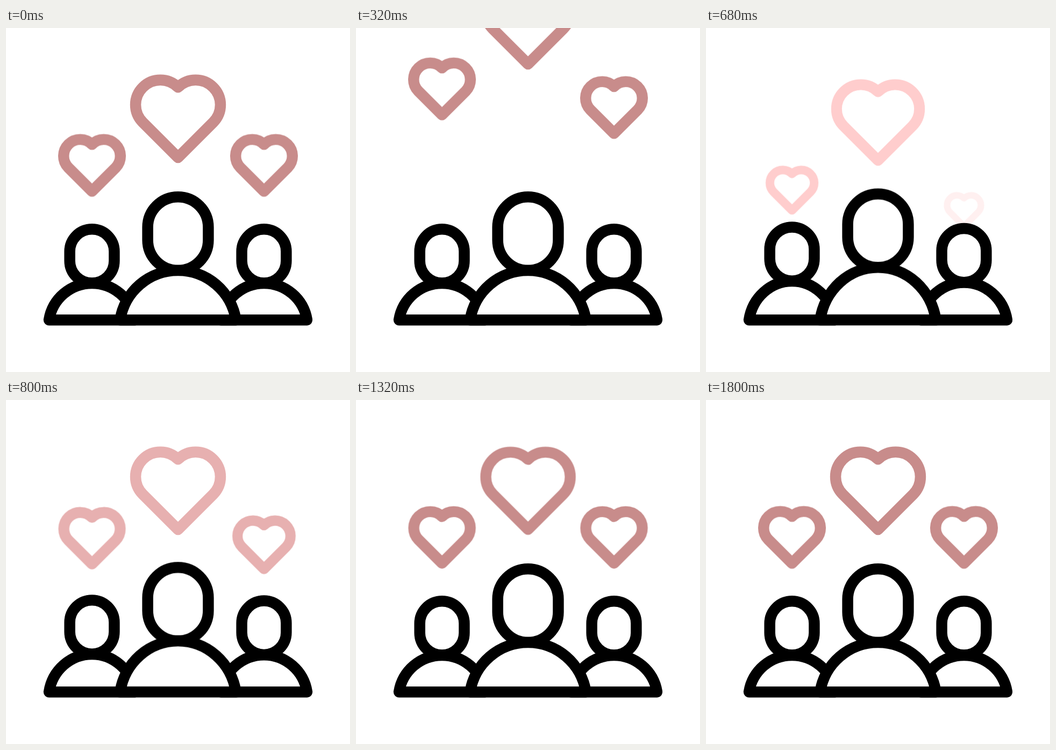
Animation of 640 by 640 pixels, one loop 2000 ms. Source, as an HTML page:

```html
<!DOCTYPE html>
<html lang="en">
<head>
<meta charset="utf-8">
<title>People and hearts</title>
<style>
  @property --lift { syntax: "<number>"; inherits: true; initial-value: 0; }

  html, body { margin: 0; width: 100%; height: 100%; overflow: hidden; background: #fff; }
  svg { display: block; width: 640px; height: 640px; }
  svg * { stroke-width: 20.48px; stroke-linejoin: round; }

  .hearts { fill: none; stroke: #c88c8b; }
  .away { animation: fly 2s infinite; }
  .gate { animation: gate 2s infinite; }
  .rise { animation: rise 2s var(--delay) infinite backwards, fade 2s var(--delay) linear infinite backwards; }
  .beat { animation: beat 2s ease-in-out infinite, tint 2s linear infinite; }

  .mid   { --delay: 411ms; --from: 310px; --p: -173px;   --q: -322px; }
  .left  { --delay: 511ms; --from: 209px; --p: -141.5px; --q: -267px; }
  .right { --delay: 564ms; --from: 209px; --p: -107px;   --q: -215px; }

  /* old hearts leave through the top */
  @keyframes fly {
    0%, 2.5% { transform: none; animation-timing-function: cubic-bezier(.33, .12, .67, .54); }
    16% { transform: translateY(var(--p)); animation-timing-function: linear; }
    24% { transform: translateY(var(--q)); animation-timing-function: linear; }
    31%, 100% { transform: translateY(calc(var(--q) - 115px)); }
  }

  /* new hearts grow from behind the heads */
  @keyframes gate {
    0%, 20.4% { visibility: hidden; }
    20.5%, 100% { visibility: visible; }
  }
  @keyframes rise {
    0% { transform: translateY(var(--from)) scale(0); animation-timing-function: cubic-bezier(.5, 1, .89, 1); }
    16%, 100% { transform: none; }
  }
  @keyframes fade {
    0%, 4.8% { opacity: 0; }
    8.3%, 85% { opacity: 1; }
    85.01%, 100% { opacity: 0; }
  }
  @keyframes tint {
    0%, 34.5% { stroke: #ffcdcd; }
    47%, 100% { stroke: #c88c8b; }
  }
  @keyframes beat {
    0%, 64% { transform: none; }
    72.8% { transform: scale(.955); }
    81.5% { transform: scale(1.046); }
    90%, 100% { transform: none; }
  }

  .people { fill: #fff; stroke: #000; }
  .person { animation: lift 2s infinite; }
  .person rect { transform: translateY(calc(var(--lift) * -1px)); }
  .person path { transform: scaleY(calc(1 + var(--lift) / var(--h))); vector-effect: non-scaling-stroke; }
  .person.mid   { --h: 92;   --a: 5.5; --b: 6.3; --c: 5.5; }
  .person.left  { --h: 68.5; --a: 3;   --b: 4.2; --c: 3.9; }
  .person.right { --h: 68.5; --a: 2.4; --b: 2.8; --c: 1.4; }

  @keyframes lift {
    0%, 17% { --lift: 0; animation-timing-function: ease-in-out; }
    24% { --lift: var(--a); animation-timing-function: ease-out; }
    29% { --lift: var(--b); animation-timing-function: ease-in; }
    34% { --lift: var(--c); animation-timing-function: ease-in-out; }
    46%, 100% { --lift: 0; }
  }
</style>
</head>
<body>
<svg viewBox="0 0 640 640">
  <defs>
    <path id="big" d="M0 72L-65.5 6.5A46.2 46.2 0 0 1 0 -58.7A46.2 46.2 0 0 1 65.5 6.5Z"/>
    <path id="small" d="M0 48.3L-44 4.3A30.8 30.8 0 0 1 0 -38.9A30.8 30.8 0 0 1 44 4.3Z"/>
  </defs>

  <g class="hearts">
    <g class="mid" transform="translate(320 169)">
      <use class="away" href="#big"/>
      <g class="gate"><g class="rise"><use class="beat" href="#big"/></g></g>
    </g>
    <g class="left" transform="translate(160 255.5)">
      <use class="away" href="#small"/>
      <g class="gate"><g class="rise"><use class="beat" href="#small"/></g></g>
    </g>
    <g class="right" transform="translate(480 255.5)">
      <use class="away" href="#small"/>
      <g class="gate"><g class="rise"><use class="beat" href="#small"/></g></g>
    </g>
  </g>

  <g class="people">
    <g class="person left" transform="translate(160 543.2)">
      <rect x="-41.4" y="-168.9" width="82.8" height="100.3" rx="41.4"/>
      <path d="M-80 0A81 81 0 0 1 80 0Z"/>
    </g>
    <g class="person right" transform="translate(480 543.2)">
      <rect x="-41.4" y="-168.9" width="82.8" height="100.3" rx="41.4"/>
      <path d="M-80 0A81 81 0 0 1 80 0Z"/>
    </g>
    <g class="person mid" transform="translate(320 543.2)">
      <rect x="-56.4" y="-229" width="112.8" height="136.8" rx="56.4"/>
      <path d="M-107.7 0A109 109 0 0 1 107.7 0Z"/>
    </g>
  </g>
</svg>
</body>
</html>
```
